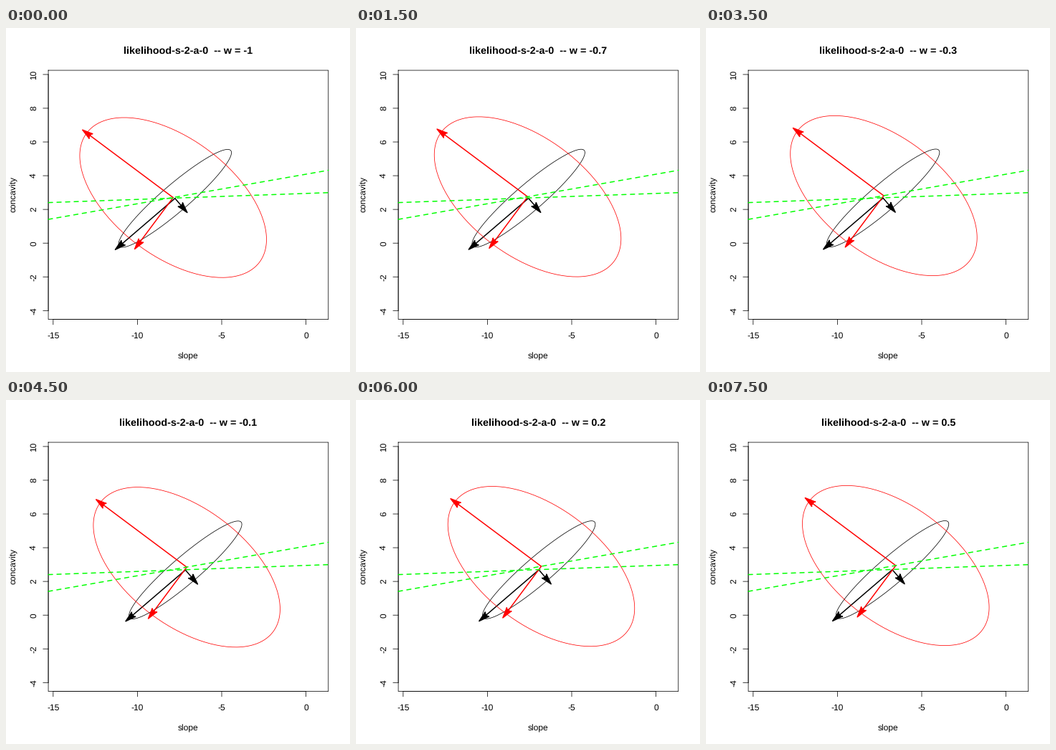
Recreate the animation shown at these times as a matplotlib script. Size 480 by 480 pixels, loop 8 s.

```python
import numpy as np
import matplotlib.pyplot as plt
from matplotlib.animation import FuncAnimation

plt.rcParams["font.family"] = "Liberation Sans"
plt.rcParams["text.hinting"] = "none"

SIZE, STEPS = 480, 16
LEFT, RIGHT, TOP, BOTTOM = 59.04, 449.76, 59.04, 406.56
THIN, THICK = 0.75, 1.5
TICK = 7.2

# Half axes in pixels and centre path from first to last step
SHAPES = [
    dict(color="black", axes=[(-77.8, 66.8), (12.3, 14.3)],
         start=(235.8, 237.7), end=(260.0, 236.8)),
    dict(color="red", axes=[(-120.6, -90.05), (-49.25, 65.95)],
         start=(233.2, 236.6), end=(264.8, 231.0)),
]


def px(slope):
    return 418.6 + 23.52 * slope


def py(concavity):
    return 300.2 - 23.53 * concavity


fig = plt.figure(figsize=(SIZE / 72, SIZE / 72), dpi=72, facecolor="white")
ax = fig.add_axes([0, 0, 1, 1])
ax.set_xlim(0, SIZE)
ax.set_ylim(SIZE, 0)
ax.axis("off")


def rule(x, y):
    ax.plot(x, y, color="black", lw=THIN, snap=False, zorder=1)


def label(x, y, text, rotation=0, **kw):
    kw.setdefault("fontsize", 12)
    return ax.text(x, y, text, ha="center", va="baseline", rotation=rotation,
                   rotation_mode="anchor", parse_math=False, **kw)


def draw_frame():
    rule([LEFT, RIGHT, RIGHT, LEFT, LEFT], [TOP, TOP, BOTTOM, BOTTOM, TOP])
    rule([px(-15), px(0)], [BOTTOM] * 2)
    rule([LEFT] * 2, [py(-4), py(10)])
    for v in range(-15, 1, 5):
        rule([px(v)] * 2, [BOTTOM, BOTTOM + TICK])
        label(px(v), 433.2, str(v))
    for v in range(-4, 11, 2):
        rule([LEFT, LEFT - TICK], [py(v)] * 2)
        label(42, py(v), str(v), 90)
    label(254.4, 462, "slope")
    label(14, 232.3, "concavity", 90)


def arrow_head(length=14.6, half_width=4, notch=1.5):
    """Head pointing along +x with a hollow back, centred on the origin."""
    a = np.linspace(-np.pi / 2, np.pi / 2, 20)
    back = np.column_stack([notch * np.cos(a) - length / 2,
                            half_width * np.sin(a)])
    return np.vstack([[length / 2, 0], back])


HEAD = arrow_head()


class Arrow:
    def __init__(self, vec, color, z):
        self.vec = np.array(vec)
        c, s = self.vec / np.hypot(*self.vec)
        self.head = HEAD @ np.array([[c, s], [-s, c]])
        self.line, = ax.plot([], [], color=color, lw=THICK, zorder=z,
                             solid_capstyle="round")
        self.patch = ax.fill(*self.head.T, facecolor=color, edgecolor=color,
                             lw=THICK, joinstyle="round", zorder=z)[0]

    def move(self, origin):
        tip = origin + self.vec
        self.line.set_data(*np.array([origin, tip]).T)
        self.patch.set_xy(self.head + tip)


class Ellipse:
    def __init__(self, color, axes, start, end, z):
        u, v = np.array(axes)
        t = np.linspace(0, 2 * np.pi, 200)[:, None]
        self.points = u * np.cos(t) + v * np.sin(t)
        self.start, self.end = np.array(start), np.array(end)
        self.curve, = ax.plot([], [], color=color, lw=THIN, zorder=z)
        self.arrows = [Arrow(a, color, z) for a in axes]

    def move(self, k):
        centre = self.start + (self.end - self.start) * k
        self.curve.set_data(*(self.points + centre).T)
        for arrow in self.arrows:
            arrow.move(centre)


draw_frame()
ellipses = [Ellipse(z=2 + i, **shape) for i, shape in enumerate(SHAPES)]
for c0, c1 in [(2.405, 2.995), (1.41, 4.32)]:
    ax.plot([LEFT, RIGHT], [py(c0), py(c1)], color="lime", lw=THICK, zorder=5,
            dashes=(4, 4), dash_capstyle="round")
title = label(254.4, 35.4, "", fontsize=14.4, fontweight="bold")


def update(i):
    for e in ellipses:
        e.move(i / (STEPS - 1))
    title.set_text(f"likelihood-s-2-a-0  -- w = {(i - 10) / 10:g}")


anim = FuncAnimation(fig, update, frames=STEPS, interval=500, repeat=True,
                     repeat_delay=0, blit=False)
plt.show()
```
